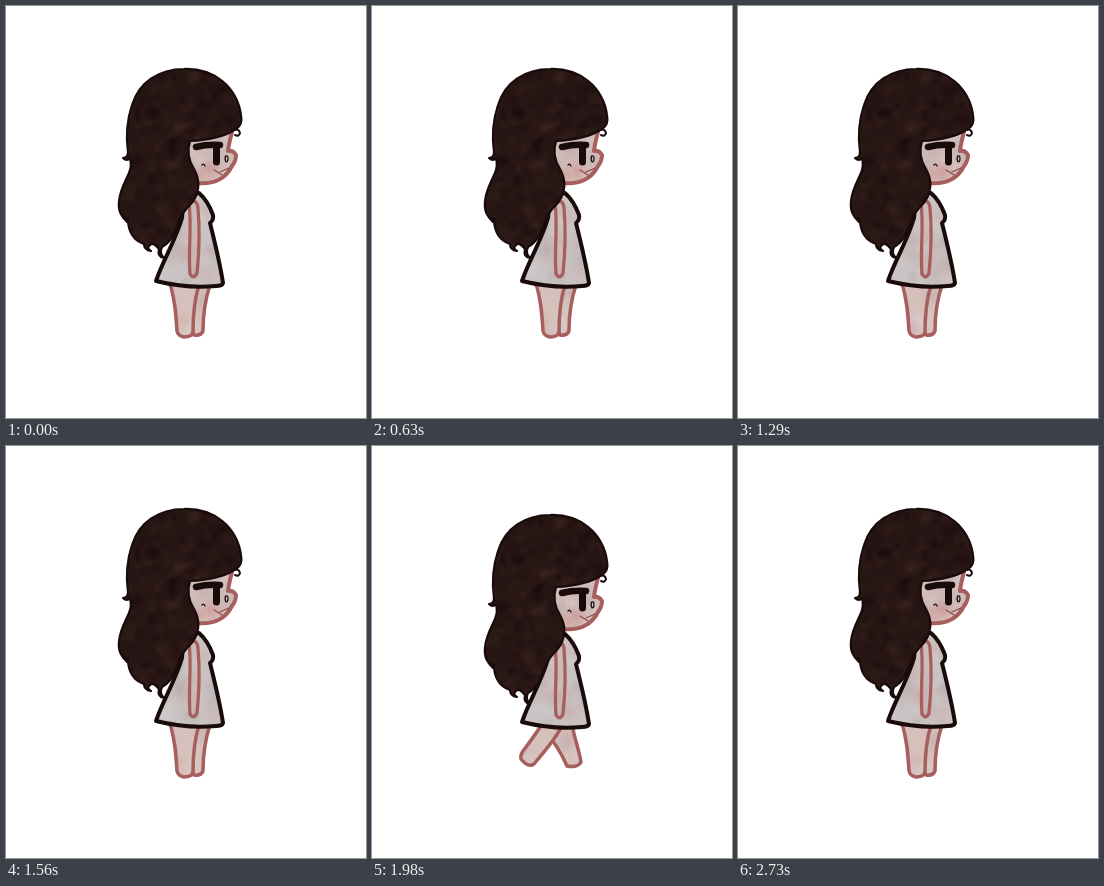
An HTML page with a canvas that plays this animation: 360x412 px, repeating every 3.09 s.

```html
<!DOCTYPE html>
<html>
<head>
<meta charset="utf-8">
<title>Walking girl</title>
<style>
html, body { margin: 0; width: 100%; height: 100%; overflow: hidden; background: #fff; }
canvas { display: block; width: 360px; height: 412px; }
</style>
</head>
<body>
<canvas id="stage" width="360" height="412"></canvas>
<script>
const ctx = document.getElementById('stage').getContext('2d');
const LOOP = 3090;
const INK = '#1a0b0b', SKIN = '#d6c0bc', SKIN_LINE = '#a65f5d', CLOTH = '#cac3c3';

const hair = new Path2D(`M178 63 C208 62 231 81 235 109 Q237 119 230 123
  C218 131 203 134 184 135 C181 145 182 154 188 163 C193 172 194 182 189 192
  C185 200 177 204 174 213 C170 222 168 234 156 241 Q153 247 158 252 Q151 251 153 243
  C149 238 146 236 143 240 Q141 243 145 245 Q138 244 138 238 C128 235 122 226 122 213
  Q119 210 121 216 C115 210 112 205 113 195 C114 184 119 176 123 167 Q126 160 124 152
  Q121 156 117 152 Q122 152 122 146 C120 132 121 114 126 99 C133 76 153 63 178 63Z`);
const curl = new Path2D('M227 124 Q233 122 234 127 Q233 131 229 129');
const face = new Path2D(`M226 124 Q223 137 222 145 Q227 144 230 149 Q230 155 226 160
  C220 172 208 179 191 177 L180 170 L180 130Z`);
const faceLine = new Path2D(`M226 126 Q223 137 222 145 Q227 144 230 149 Q230 155 226 160
  C220 172 208 179 191 177`);
const dress = new Path2D(`M178 188 L193 187 Q202 195 207 209 Q208 214 204 217
  C209 237 214 257 217 277 Q216 280 210 280 C190 282 166 279 150 275
  C157 254 169 236 176 212Z`);
const arm = new Path2D('M183 197 Q191 192 192 202 C194 225 193 248 191 267 Q188 274 184 268 C182 245 186 220 183 197Z');
const standingLegs = [
  new Path2D('M189 278 L204 279 C199 294 197 311 197 325 Q195 330 188 329 L185 322Z'),
  new Path2D('M164 278 L193 279 C188 295 187 311 187 326 Q186 331 178 331 Q172 330 171 325 C170 308 169 293 164 278Z')
];
const crossedLegs = [
  new Path2D('M172 278 L200 278 C202 291 207 304 209 316 Q206 322 195 320 C190 309 184 297 176 290Z'),
  new Path2D('M170 278 L191 278 C184 293 171 307 162 318 Q156 322 149 313 Q148 310 151 305 C157 297 164 288 170 278Z')
];

function makeSpots(seed, count, box, radius, colors) {
  const random = () => (seed = (seed * 16807) % 2147483647) / 2147483647;
  return Array.from({ length: count }, (_, i) => ({
    x: box[0] + random() * box[2],
    y: box[1] + random() * box[3],
    r: radius * (0.6 + random() * 0.8),
    turn: random() * Math.PI * 2,
    color: colors[i % colors.length]
  }));
}

const hairSpots = makeSpots(71, 380, [112, 62, 126, 192], 7,
  ['rgba(70,43,39,.24)', 'rgba(18,6,6,.28)']);
const paleSpots = makeSpots(313, 80, [145, 125, 88, 210], 12,
  ['rgba(217,212,212,.42)', 'rgba(164,156,160,.28)', 'rgba(203,166,163,.38)']);
const blush = [
  { x: 204, y: 164, r: 13, turn: 0, color: 'rgba(190,105,102,.38)' },
  { x: 191, y: 170, r: 10, turn: 0, color: 'rgba(190,105,102,.30)' }
];

function paintSpots(path, spots, phase, drift) {
  ctx.save();
  ctx.clip(path);
  for (const s of spots) {
    const x = s.x + drift * Math.cos(phase + s.turn);
    const y = s.y + drift * Math.sin(phase + s.turn);
    const glow = ctx.createRadialGradient(x, y, 0, x, y, s.r);
    glow.addColorStop(0, s.color);
    glow.addColorStop(1, s.color.replace(/,[^,]+\)$/, ',0)'));
    ctx.fillStyle = glow;
    ctx.fillRect(x - s.r, y - s.r, s.r * 2, s.r * 2);
  }
  ctx.restore();
}

function fillTextured(path, color, spots, phase, drift) {
  ctx.fillStyle = color;
  ctx.fill(path);
  paintSpots(path, spots, phase, drift);
}

function line(path, color, width) {
  ctx.strokeStyle = color;
  ctx.lineWidth = width;
  ctx.stroke(typeof path === 'string' ? new Path2D(path) : path);
}

function drawHead(phase) {
  fillTextured(face, SKIN, paleSpots, phase, 4);
  paintSpots(face, blush, 0, 0);
  line(faceLine, SKIN_LINE, 4);
  line('M190 141 Q202 138 214 139', INK, 6.5);
  line('M210.5 142 L210.5 156', INK, 7);
  line('M219.5 150 Q222 149 222 153 Q222 156 220 156 Q218.5 154 219.5 150', INK, 1.2);
  line('M196 159 Q198 157 199 160', INK, 1.3);
  line('M208 164 L216 169 M214 166 L223 162', '#8c4b4a', 1.2);
  fillTextured(hair, '#271614', hairSpots, 0, 0);
  line(hair, INK, 2.2);
  line(curl, INK, 2);
}

function draw(time) {
  const crossed = (time >= 660 && time < 1290) || (time >= 1890 && time < 2520);
  // The watercolour drifts for 1440 ms, then rests for 360 ms.
  const frameTime = Math.floor(time / 30) * 30;
  const drift = Math.min((frameTime + 510) % 1800, 1440);
  const phase = drift / 900 * Math.PI * 2;

  ctx.fillStyle = '#fff';
  ctx.fillRect(0, 0, 360, 412);
  ctx.lineCap = ctx.lineJoin = 'round';

  for (const leg of crossed ? crossedLegs : standingLegs) {
    fillTextured(leg, SKIN, paleSpots, phase, 4);
    line(leg, SKIN_LINE, 3.5);
  }

  ctx.save();
  if (crossed) ctx.translate(0, 1);
  fillTextured(dress, CLOTH, paleSpots, phase, 4);
  line(dress, INK, 4);
  fillTextured(arm, '#cbbcbb', paleSpots, phase, 4);
  line(arm, SKIN_LINE, 3.3);
  ctx.restore();

  ctx.save();
  if (crossed) ctx.translate(0, 6);
  drawHead(phase);
  ctx.restore();
}

function tick() {
  draw(performance.now() % LOOP);
  requestAnimationFrame(tick);
}
tick();
</script>
</body>
</html>
```
